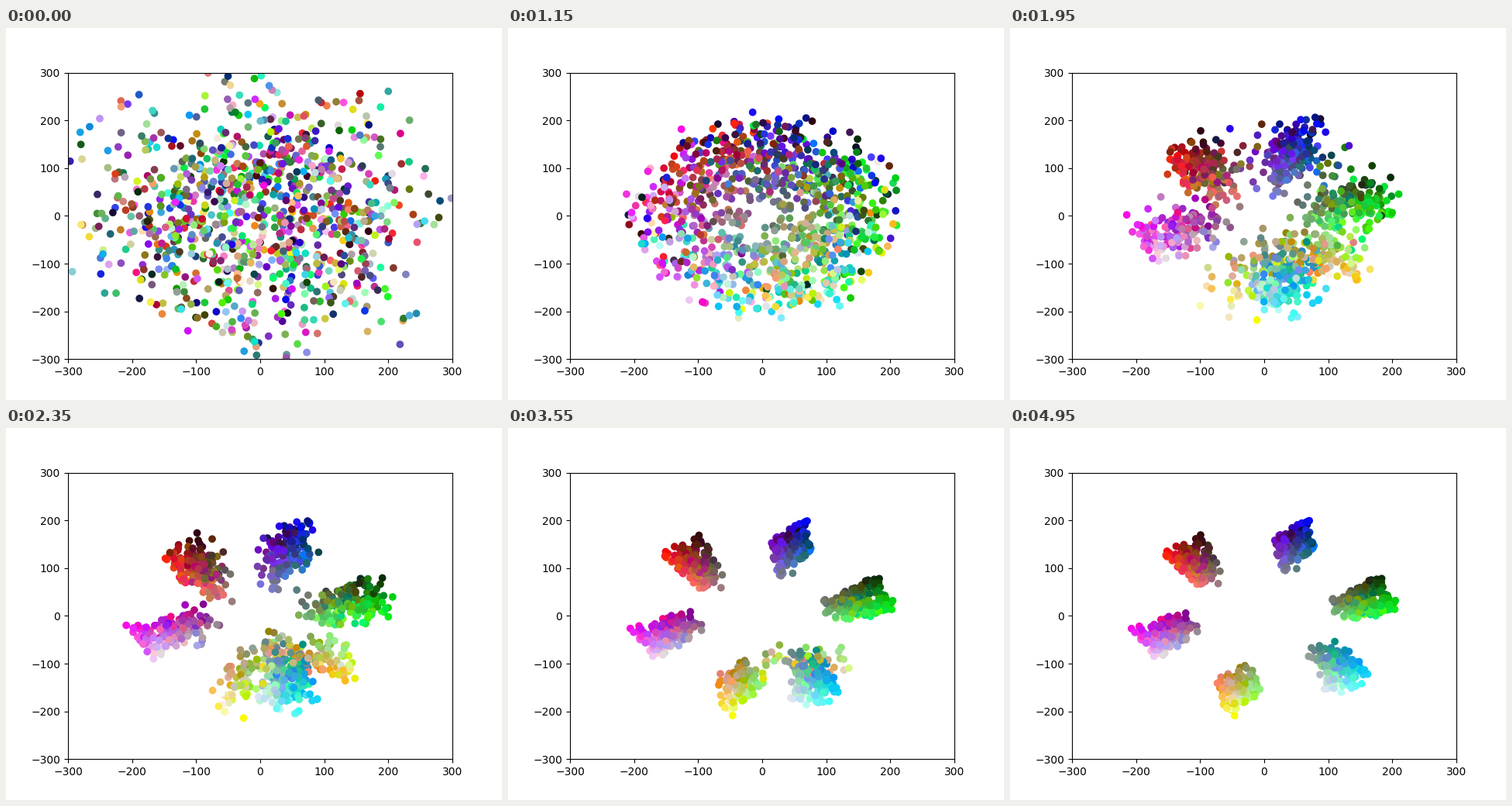
A matplotlib script that plays this animation: 640x480 px, repeating every 5000 ms.

```python
import numpy as np
import matplotlib.pyplot as plt
from matplotlib.animation import FuncAnimation

COUNT, FRAMES, INTERVAL = 1000, 100, 50
rng = np.random.default_rng(12)
colors = rng.random((COUNT, 3))


def smooth(x, begin, end):
    u = np.clip((x - begin) / (end - begin), 0, 1)
    return u * u * (3 - 2 * u)


# Families 0-2 are red, blue, green; 3-5 their complements cyan, yellow, magenta.
light = np.sort(colors, axis=1)[:, 1] > 0.5
mix = np.where(light[:, None], 1 - colors, colors)[:, [0, 2, 1]]
hue = mix.argmax(axis=1)
family = hue + 3 * light
cyan, yellow = family == 3, family == 4

main = mix.max(axis=1)
side = (mix.sum(axis=1) - main) / 2
rest = np.where(hue == 0, mix[:, 2] - mix[:, 1], mix[:, 0] - mix[:, 2])
rest = np.where(hue == 2, mix[:, 0] - mix[:, 1], rest)

# Each family is a wedge: grey inside, pure colour and black or white outside.
tilt = 1 - hue
across = ((80 * main - 50) * tilt + 20 * side * tilt
          + (12 + 58 * (hue == 1)) * rest)
base_heading = np.radians(131 - 59 * family)

# Loose cloud, then a disc that sorts dull colours in and vivid ones out.
start_angle = rng.uniform(-np.pi, np.pi, COUNT)
start_radius = 128 * (-2 * np.log(1 - rng.random(COUNT))) ** 0.42
vivid = np.linalg.norm(colors - 0.5, axis=1) + rng.normal(0, 0.07, COUNT)
disc_radius = 208 * ((vivid.argsort().argsort() + 1) / COUNT) ** 0.55

turn_end = 30 + 25 * rng.random(COUNT) ** 2
arm_begin = rng.uniform(0, 75, COUNT)
noise = np.clip(rng.standard_t(3, (2, COUNT)), -4, 4)


def home(frame):
    """Polar place of every dot inside its family's wedge."""
    drift = np.clip((frame - 39) / 60, 0, 1)
    grey = 45 + 50 * smooth(frame, 30, 90)
    along = 195 + 23 * main + side * (2 * grey - 413)

    # Yellow dots cross one by one over cyan, which swings out to the right.
    arm = smooth(frame, arm_begin, arm_begin + 24)
    heading = base_heading - np.radians(36) * (1 - drift) * cyan
    heading = heading + np.radians(65) * (1 - arm) * yellow
    radius = np.hypot(along, across) * (1 - 0.45 * np.sin(np.pi * arm) * yellow)
    return heading + np.arctan2(across, along), radius


gap = (start_angle - home(0)[0] + np.pi) % (2 * np.pi) - np.pi


def positions(frame):
    angle, radius = home(frame)
    angle = angle + gap * (1 - smooth(frame, 4, turn_end))
    gather = 1 - (1 - min(frame / 10, 1)) ** 3
    disc = start_radius + (disc_radius - start_radius) * gather
    radius = disc + (radius - disc) * smooth(frame, 12, 38)
    jitter = 2 + 10 * (1 - smooth(frame, 32, 62))
    x, y = radius * [np.cos(angle), np.sin(angle)] + jitter * noise
    return np.column_stack([x, y])


fig, ax = plt.subplots(figsize=(6.4, 4.8), dpi=100)
dots = ax.scatter(*positions(0).T, c=colors)
ax.set_xlim(-300, 300)
ax.set_ylim(-300, 300)


def draw(frame):
    dots.set_offsets(positions(frame))
    return dots,


anim = FuncAnimation(fig, draw, frames=FRAMES, interval=INTERVAL,
                     repeat=True, repeat_delay=0)
plt.show()
```
